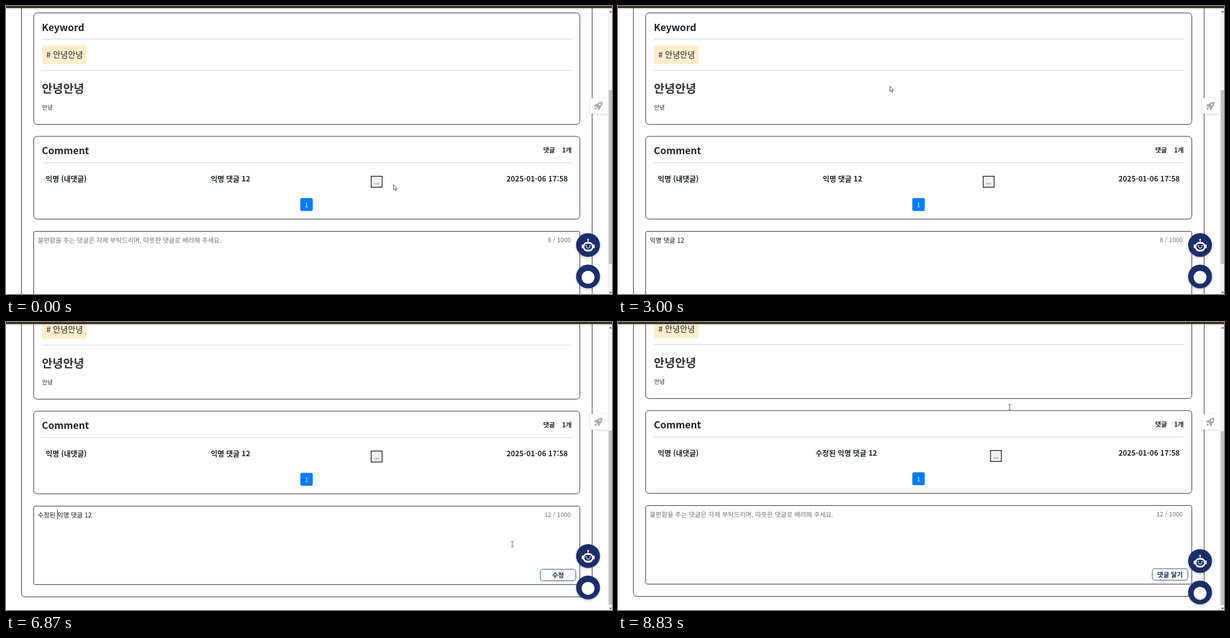
Write an HTML page that moves like this. It is 1083x517 px and loops after 9.52 s.

```html
<!DOCTYPE html>
<html lang="ko">
<head>
<meta charset="utf-8">
<title>Comment edit</title>
<style>
html, body { margin: 0; width: 100%; height: 100%; overflow: hidden; background: #fff; }
svg { display: block; width: 1083px; height: 517px; }
text { font-family: "Noto Sans CJK KR", "Noto Sans CJK", "Noto Sans", sans-serif; white-space: pre; fill: #212529; }
.b { font-weight: 600; }
.card { fill: #fff; stroke: #2b2b30; }
.hr { stroke: #cfcfcf; }
.h { font-size: 17.4px; font-weight: 700; }
.row { font-size: 13px; font-weight: 600; }
.t { font-size: 11.5px; }
.d { font-size: 10px; fill: #e6e2d3; }
.mid { text-anchor: middle; }
.end { text-anchor: end; }
</style>
</head>
<body>
<svg viewBox="0 0 1083 517">
  <defs>
    <filter id="soft" x="-30%" y="-30%" width="160%" height="160%">
      <feDropShadow dx="0" dy="1.5" stdDeviation="2" flood-color="#000" flood-opacity=".28"/>
    </filter>
    <filter id="faint" x="-30%" y="-30%" width="160%" height="160%">
      <feDropShadow dx="0" dy="1" stdDeviation="2" flood-color="#000" flood-opacity=".18"/>
    </filter>
  </defs>

  <g id="page">
    <rect class="card" x="27.5" y="-60" width="1020" height="627.5" rx="6"/>
    <rect class="card" x="49.5" y="12.5" width="976" height="200" rx="6"/>
    <text class="h" x="64" y="44.5">Keyword</text>
    <path class="hr" d="M64 59.5H1011M64 115.5H1011M64 281.5H1011"/>
    <rect x="64" y="71" width="80.5" height="33" fill="#ffedcc"/>
    <text x="72" y="93" font-size="14.5">#&#160;안녕안녕</text>
    <text x="64" y="155.5" font-size="20.6" font-weight="700" style="fill:#333">안녕안녕</text>
    <text x="64.5" y="185.8" font-size="10.4">안녕</text>

    <rect class="card" x="49.5" y="234" width="976" height="148.5" rx="6"/>
    <path class="hr" d="M64 281.5H1011"/>
    <text class="h" x="64" y="266">Comment</text>
    <text class="t b" x="960" y="263.3">댓글</text>
    <text class="t b end" x="1011" y="263.3">1개</text>
    <text class="row" x="71" y="314.5">익명 (내댓글)</text>
    <text class="row" id="entry" y="314.5"></text>
    <text class="row end" x="1004" y="314.5">2025-01-06 17:58</text>
    <g id="more">
      <rect x="652.6" y="305.6" width="19.6" height="19.8" fill="#efefef" stroke="#111" stroke-width="1.3"/>
      <text class="t mid" x="662.4" y="319.5">...</text>
    </g>
    <rect x="526" y="344.7" width="22.2" height="23.3" rx="3" fill="#007bff"/>
    <text class="mid" x="537.1" y="360.5" font-size="10.5" style="fill:#fff">1</text>

    <rect class="card" x="49.5" y="404.5" width="976" height="141" rx="3"/>
    <text class="t" id="field" x="56.7" y="424.5"></text>
    <rect id="caret" y="411" width="1" height="17" fill="#111"/>
    <text class="end" id="count" x="1009.3" y="423.8" font-size="11" style="fill:#6c6c6c"></text>
    <rect x="954.9" y="517.9" width="63.4" height="20.6" rx="4.5" fill="#fff" stroke="#2a4878"/>
    <text class="t mid b" id="send" x="986.6" y="532.6" style="fill:#14294f"></text>
  </g>

  <g id="menu">
    <rect x="559.5" y="326.5" width="112.5" height="74" rx="1" fill="#fff" stroke="#d4d4d4" filter="url(#faint)"/>
    <rect id="hover" x="560" y="332" width="112" height="31.3" fill="#f0f0f0"/>
    <text class="t" x="567" y="352.3">수정</text>
    <text class="t" x="567" y="383.3">삭제</text>
  </g>

  <g filter="url(#faint)"><path d="M1076 165.5H1047.5a3 3 0 0 0-3 3V190a3 3 0 0 0 3 3H1076z" fill="#fff"/></g>
  <g fill="#a7aebb">
    <path d="M1065.8 172c-5.6-.2-8 1.6-10 4l-3.6.6-1.6 3.8 3.4-.4 4 4-.4 3.6 3.8-1.8.8-3.6c2.400-2 4-4.600 3.600-10.200z"/>
    <path d="M1053.600 181.600l2.800 2.800c-1 1.600-2.600 1.800-4.600 1.800 0-2 .4-3.600 1.800-4.600z"/>
    <circle cx="1061.400" cy="176.600" r="1.500" fill="#fff"/>
  </g>

  <rect x="1076" y="4" width="7" height="513" fill="#f3f3f3"/>
  <rect id="thumb" x="1077" width="6" height="312" fill="#c1c1c1"/>
  <path d="M1078 11.500l2.500-3 2.500 3zM1078 513l2.500 3 2.500-3z" fill="#555"/>

  <g id="chat">
    <circle cx="1040.200" cy="429" r="21.300" fill="#1b2e68" filter="url(#soft)"/>
    <circle cx="1040.200" cy="485.500" r="21.300" fill="#1b2e68" filter="url(#soft)"/>
    <circle cx="1040.200" cy="487" r="11.500" fill="#fff"/>
    <g fill="#fff">
      <circle cx="1040.400" cy="419.600" r="1.600"/>
      <path d="M1039.800 420h1.200v5h-1.200z"/>
      <rect x="1028.800" y="428" width="3" height="7" rx="1.400"/>
      <rect x="1049" y="428" width="3" height="7" rx="1.400"/>
      <rect x="1031.200" y="423.500" width="18.400" height="17.300" rx="8"/>
    </g>
    <rect x="1033.600" y="426.800" width="13.600" height="10.600" rx="5" fill="#1b2e68"/>
    <g fill="none" stroke="#fff" stroke-width="1.300" stroke-linecap="round">
      <path d="M1036 430.800q1-1.600 2 0M1042.800 430.800q1-1.600 2 0M1037.600 433.200q2.800 3 5.600 0"/>
    </g>
  </g>

  <rect width="1083" height="4" fill="#3f3725"/>

  <g id="dialog">
    <rect x="384" y="-20" width="318.500" height="121.700" rx="8" fill="#201f18" stroke="#55534a" stroke-width=".7" filter="url(#soft)"/>
    <text class="d" x="398.500" y="24.500" style="font-size:11.300px">medihub.info 내용:</text>
    <text class="d" id="say" x="398.500" y="45.700"></text>
    <g id="ok">
      <rect x="589.700" y="58.500" width="49.300" height="31" rx="15.500" fill="none" stroke="#d8cb78" stroke-width="1.500"/>
      <rect x="591.800" y="60.500" width="45.200" height="27" rx="13.500" fill="#d6ca71"/>
      <text class="d mid" x="614.400" y="77.500" style="fill:#5b5226">확인</text>
    </g>
    <g id="cancel">
      <rect x="642.700" y="60.700" width="45.200" height="26.400" rx="13.200" fill="none" stroke="#5b5740"/>
      <text class="d mid" x="665.400" y="77.500" style="fill:#cdc06c">취소</text>
    </g>
  </g>

  <g id="cursor">
    <path id="arrow" d="M.5.500V10.300L2.700 8.300 4.200 11.700 5.700 11 4.300 7.800H7z" fill="#fff" stroke="#222" stroke-width=".8"/>
    <path id="hand" d="M-1.100 1q1.100-1.800 2.200 0v4.500l4.400 1.200q1 .5.900 1.800l-.8 3.500-.9 2.500h-5.500l-2.700-4-1.300-2.500q.6-1.600 2-.4l1.700 1.600z" fill="#fff" stroke="#222" stroke-width=".9"/>
    <path id="beam" d="M-2.300-5H-.6L0-4.500.6-5H2.300M0-4.500V4.500M-2.300 5H-.6L0 4.500.6 5H2.300" fill="none" stroke="#444" stroke-width=".9"/>
  </g>
</svg>
<script>
const LOOP = 9520;
const el = {};
document.querySelectorAll('[id]').forEach(n => el[n.id] = n);

const OLD = '익명 댓글 12';
const HINT = '불편함을 주는 댓글은 자제 부탁드리며, 따뜻한 댓글로 배려해 주세요.';
const typed = [[5000, 'ㅅ'], [5070, '수'], [5150, '숮'], [5220, '수저'], [5300, '수정'],
  [5380, '수정ㄷ'], [5460, '수정도'], [5530, '수정되'], [5740, '수정된 ']];

// time, x, y, shape in use from then on
const moves = [
  [0, 692, 320, 'arrow'], [260, 692, 320, 'arrow'], [460, 642, 324, 'arrow'], [600, 657, 318, 'arrow'],
  [750, 657, 318, 'arrow'], [900, 640, 334, 'hand'], [1250, 592, 341, 'hand'], [1650, 586, 343, 'hand'],
  [1780, 586, 343, 'hand'], [2110, 586, 300.500, 'hand'], [2430, 604, 106, 'arrow'], [2730, 613, 73, 'arrow'],
  [2820, 613, 73, 'arrow'], [3250, 310, 240, 'arrow'], [3520, 75, 406, 'beam'], [3620, 50, 442, 'beam'],
  [3720, 50, 426, 'beam'], [3920, 50, 426, 'beam'], [4120, 63, 420, 'beam'], [4330, 58.500, 420, 'beam'],
  [6210, 58.500, 420, 'beam'], [6380, 420, 424, 'beam'], [6580, 850, 403, 'arrow'], [6605, 857, 402.500, 'arrow'],
  [6700, 880, 400, 'beam'], [6870, 904.500, 398.500, 'beam'], [7080, 980, 447, 'hand'], [7140, 985, 451, 'hand'],
  [7650, 985, 451, 'hand'], [7740, 930, 425, 'beam'], [7960, 752, 343.500, 'beam'], [8100, 714, 318, 'beam'],
  [8160, 714, 318, 'beam'], [8360, 700, 153, 'beam'], [LOOP, 700, 153, 'beam']];

const clamp = v => Math.max(0, Math.min(1, v));
const ramp = (t, from, len) => clamp((t - from) / len);
const show = (n, on) => n.setAttribute('display', on ? 'inline' : 'none');
const shift = (n, x, y) => n.setAttribute('transform', `translate(${x} ${y})`);
const write = (n, s) => { if (n.textContent !== s) n.textContent = s; };
const within = (t, a, b) => t >= a && t < b;

function drawCursor(t) {
  let i = moves.length - 2;
  while (moves[i][0] > t) i--;
  const a = moves[i], b = moves[i + 1];
  const p = ramp(t, a[0], b[0] - a[0]);
  shift(el.cursor, a[1] + (b[1] - a[1]) * p, a[2] + (b[2] - a[2]) * p);
  for (const kind of ['arrow', 'hand', 'beam']) show(el[kind], a[3] === kind);
  show(el.cursor, !within(t, 5000, 6210));
}

function drawField(t) {
  let prefix = '';
  for (const [at, s] of typed) if (t >= at) prefix = s;
  const editing = within(t, 2800, 8690);
  write(el.field, editing ? prefix + OLD : HINT);
  el.field.style.fill = editing ? '#111' : '#757575';
  write(el.count, `${8 + prefix.length} / 1000`);
  write(el.send, editing ? '수정' : '댓글 달기');
  const n = prefix.length;
  el.caret.setAttribute('x', 56.500 + (n ? Math.round(el.field.getSubStringLength(0, n)) : 0));
  show(el.caret, within(t, 4230, 4730) || within(t, 5000, 6240) || within(t, 6740, 7240));
}

function drawDialog(t) {
  const second = t > 5000;
  const a = second ? ramp(t, 7831, 150) - ramp(t, 8620, 140) : ramp(t, 1780, 150) - ramp(t, 2790, 140);
  show(el.dialog, a > 0);
  el.dialog.setAttribute('opacity', a);
  shift(el.dialog, 0, -14 * (1 - a));
  write(el.say, second ? '댓글이 수정되었습니다.' : '댓글을 수정하시겠습니까?');
  shift(el.ok, second ? 51 : 0, 0);
  show(el.cancel, !second);
}

function draw(t) {
  const s = ramp(t, 6625, 285), eased = 1 - (1 - s) * (1 - s);
  shift(el.page, 0, -Math.round(75 * eased));
  el.thumb.setAttribute('y', 151 + 45 * eased);
  shift(el.chat, 0, -9 * eased * (1 - ramp(t, 7100, 200)));

  const done = t >= 8800;
  write(el.entry, (done ? '수정된 ' : '') + OLD);
  el.entry.setAttribute('x', done ? 353 : 366);
  shift(el.more, done ? 13 : 0, 0);

  show(el.menu, within(t, 750, 2800));
  show(el.hover, t >= 900);
  drawField(t);
  drawDialog(t);
  drawCursor(t);
}

const start = performance.now();
function tick() {
  draw((performance.now() - start) % LOOP);
  requestAnimationFrame(tick);
}
tick();
</script>
</body>
</html>
```
